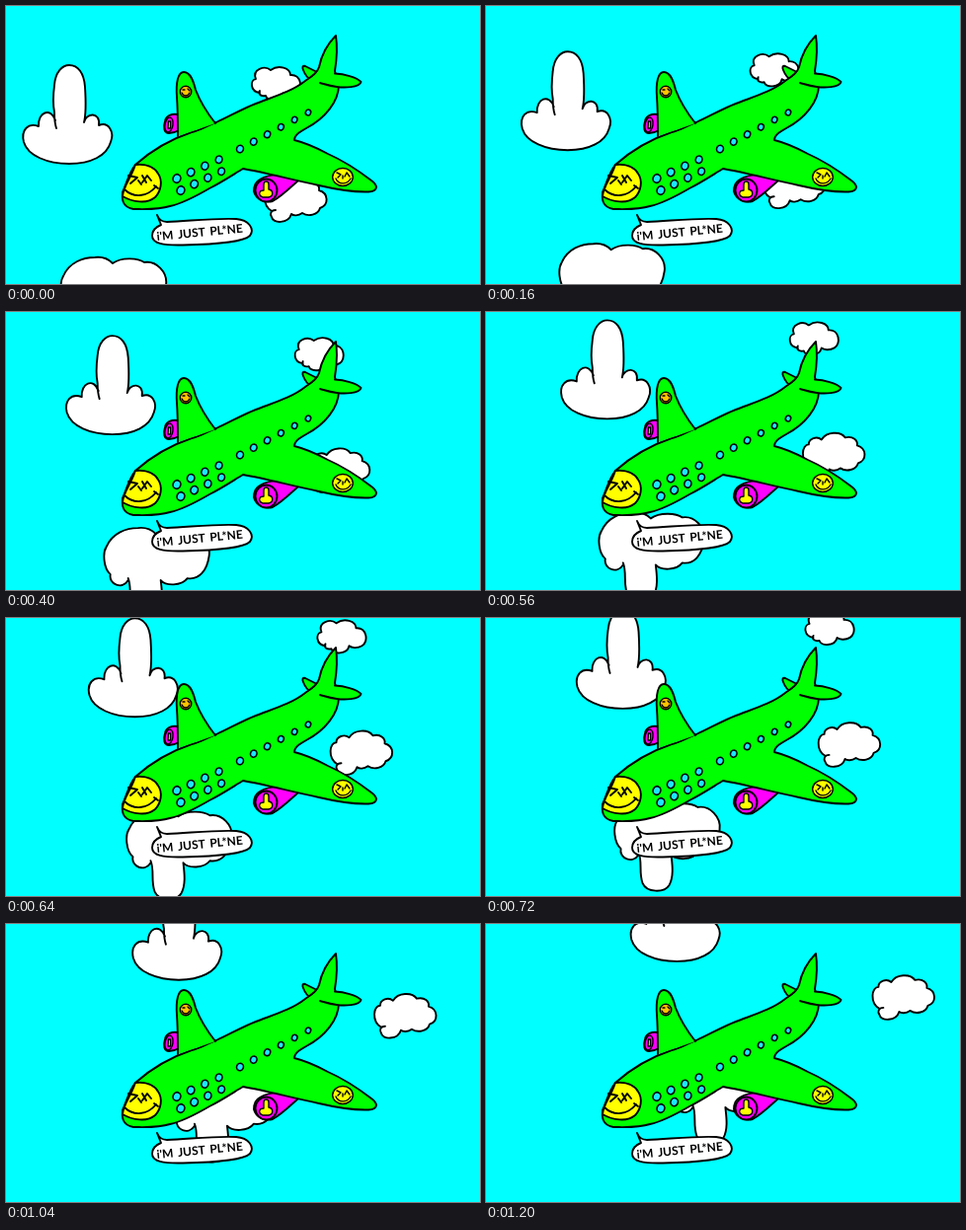
Animation of 480 by 282 pixels, one loop 1280 ms. Source, as an HTML page:

```html
<!DOCTYPE html>
<html lang="en">
<head>
<meta charset="utf-8">
<title>Just a plane</title>
<style>
html, body { margin: 0; width: 100%; height: 100%; overflow: hidden; background: #0ff; }
svg { display: block; width: 100vw; height: 100vh; }
path, ellipse, circle { stroke: #000; stroke-width: 1.9; stroke-linejoin: round; stroke-linecap: round; }
.white { fill: #fff; }
.green { fill: #0f0; }
.pink { fill: #f0f; }
.yellow { fill: #ff0; }
.line { fill: none; }
.fine > *, .fine { stroke-width: 1.4; }
#windows ellipse { fill: #1ce6ff; stroke-width: 1.6; }
text { font: 700 12px Lato, "Open Sans", sans-serif; word-spacing: 2px; }
</style>
</head>
<body>
<svg viewBox="0 0 480 282">
  <g id="clouds" class="white">
    <path d="M51 124C49 118 49 114 49 108C47 98 48 88 49 80C50 67 57 60 64 60C73 60 79 68 80 82C81 98 81 110 79 118C81 108 96 107 94 121C104 117 110 128 106 138C102 152 86 160 64 160C42 160 22 152 18 138C15 126 22 118 33 122C32 108 45 102 50 116"/>
    <path d="M80 308C74 318 60 312 62 302C55 296 54 280 58 274C64 260 78 255 90 255C98 254 104 257 108 261C118 254 134 256 140 260C152 258 164 270 162 283C160 298 152 308 140 306C134 314 118 314 113 308C114 317 116 330 111 339C106 347 88 347 84 337C80 326 84 316 80 306"/>
    <path d="M257 88C247 87 247 75 253 74C249 64 262 60 268 65C276 59 288 63 288 70C299 69 301 84 294 88C289 91 283 90 281 88C279 97 264 97 263 91C259 92 255 90 257 86"/>
    <path d="M269 208C259 202 261 186 268 186C268 180 276 177 281 181C286 173 300 172 305 179C313 177 318 182 317 187C327 190 327 202 318 205C316 212 306 214 300 210C296 213 291 213 289 211C286 221 270 221 269 214C267 211 268 207 273 207"/>
  </g>

  <path class="pink" d="M174 110C168 109 162 111 161 117C159 123 160 129 165 129C169 129 172 128 175 126Z"/>
  <ellipse class="pink fine" cx="165" cy="120.500" rx="4" ry="7.500" transform="rotate(10 165 120.500)"/>
  <path class="yellow fine" d="M164 124L164.500 117L166.500 117L166.500 124Z"/>
  <path class="green" d="M315 67L303 61C300 60 300 63 301 65C303 70 305 73 309 75Z"/>

  <path class="pink" d="M257 176C267 170 285 168 296 177C288 184 279 193 270 198C262 200 253 196 251 188C251 182 253 178 257 176Z"/>
  <ellipse class="pink" cx="263.500" cy="187" rx="11" ry="11.500"/>
  <path class="yellow fine" d="M261 187L261 181C261 177 266 177 266 181L266 186C271 187 271 193 266 194L260 194C255 192 256 187 261 187Z"/>

  <path class="green" d="M131 161C149 145 167 135 188 128C197 126 204 121 213 118C228 111 240 104 253 99C271 92 289 87 303 76C310 71 315 68 317 62C320 47 328 36 334 30C336 43 335 54 333 66L337 80C337 97 323 114 304 124C297 128 292 131 292 136C304 139 315 144 326 150C344 158 357 167 370 177C377 182 377 188 367 188.500C352 189 334 186 317 182C288 176 263 169 240 165C230 171 218 179 206 185C194 192 180 200 166 203C154 207 140 206 129 206C119 204 117 198 118 189C123 178 124 170 131 161Z"/>
  <path class="green" d="M333 68.500C342 69 355 72 359.500 77C358 83 342 83 335 82C327 81 322 79 318 78"/>
  <path class="green" d="M174 132C174 118 174 105 173 92C172 78 174 67 180 67C187 67 190 77 192 85C197 98 205 110 212 119"/>

  <path class="yellow" d="M131 161C141 160 150 163 154 170C159 177 157 188 151 194C143 201 128 199 118 193C119 182 126 176 131 161Z"/>
  <g class="line">
    <path d="M124 172L133 174L126 180M138 172L142 179M147 177L143 172L138 179M134 177L137 181"/>
    <path d="M120 186C129 195 143 194 152 183M150 182L154 185"/>
  </g>
  <g id="windows"></g>
  <g class="fine">
    <circle cx="182" cy="87" r="5.800" fill="#ffc400"/>
    <path class="line" d="M179 85L181 85M184 84L186 86M178 88C180 92 184 92 186 88"/>
    <ellipse class="yellow" cx="341" cy="173.500" rx="10.300" ry="9"/>
    <path class="line" d="M335 169L339 171L336 174M343 173L345 169L348 173M341 172L341 175M334 175C337 182 346 181 349 175"/>
  </g>

  <path class="white" d="M153 212C155 217 158 219 163 219C187 218 211 215 233 216C246 217 252 226 247 233C240 240 204 242 179 242.500C159 243 148 241 148 233C148 227 152 224 157 222Z"/>
  <text transform="translate(153 238) rotate(-5.500)">i'M JUST PL*NE</text>
</svg>
<script>
const clouds = document.getElementById('clouds');
const STEP = 80, STEPS = 16;

// evenly spaced windows that shrink towards the tail
function windowRow(count, x, y, dx, dy, r) {
  let row = '';
  for (let i = 0; i < count; i++) {
    row += `<ellipse rx="${r}" ry="${r * 1.12}" transform="translate(${x} ${y}) rotate(20)"/>`;
    x += dx;
    y += dy;
    r *= 0.95;
  }
  return row;
}
document.getElementById('windows').innerHTML =
  windowRow(4, 173, 175, 14.2, -6.4, 3.9) +
  windowRow(4, 177, 187, 13.7, -6.4, 3.9) +
  windowRow(6, 237, 145, 13.8, -7.4, 3.4);

// the sky slides right with a little sway and rises ever faster
function draw() {
  const step = Math.floor(performance.now() / STEP) % STEPS;
  const x = 8.5 * step + 2 * Math.sin(step / 2);
  const y = -6.7 * step - 0.096 * step * step;
  clouds.setAttribute('transform', `translate(${x} ${y})`);
  requestAnimationFrame(draw);
}
draw();
</script>
</body>
</html>
```
